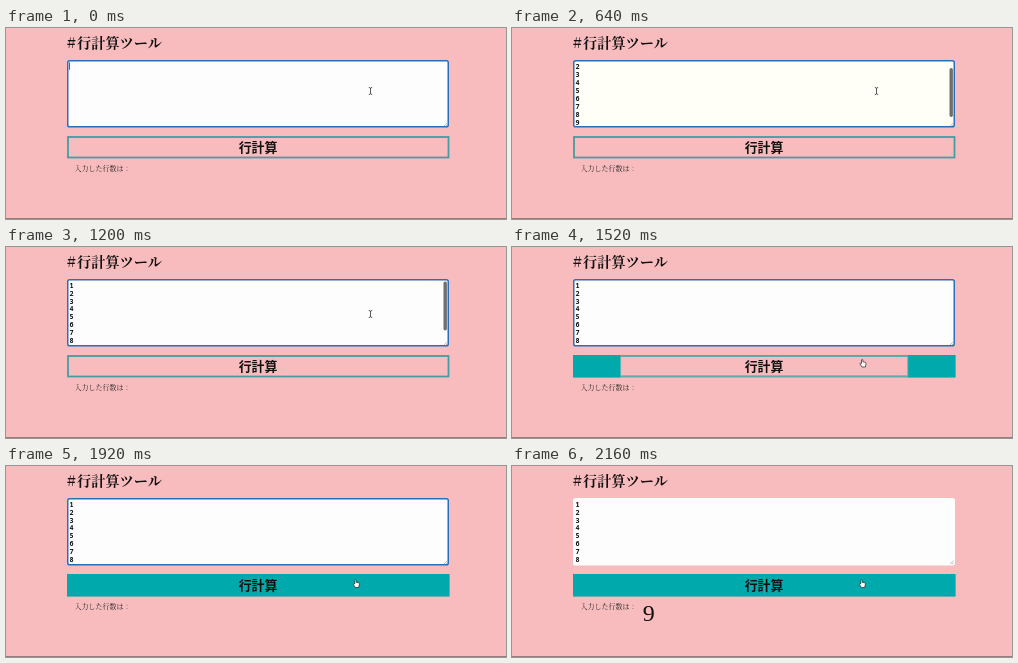
An HTML page for the animation above (2.56 s loop, 500 by 191 pixels).

```html
<!DOCTYPE html>
<html lang="ja">
<head>
<meta charset="utf-8">
<title>行計算ツール</title>
<style>
  html, body { margin: 0; width: 100%; height: 100%; overflow: hidden; background: #f9bcbe; }
  svg { display: block; width: 100vw; height: 100vh; }
  .serif { font-family: "Noto Serif CJK JP", "Noto Serif JP", "Noto Sans CJK JP", "Noto Sans CJK", serif; }
  .sans { font-family: "Noto Sans CJK JP", "Noto Sans CJK", sans-serif; }
  .mono { font-family: "Noto Sans Mono", monospace; }
  .count { font-family: "Liberation Serif", serif; }
</style>
</head>
<body>
<svg viewBox="0 0 500 191" xmlns="http://www.w3.org/2000/svg">
  <defs>
    <clipPath id="view"><rect x="62" y="33" width="380" height="65.5"/></clipPath>
  </defs>
  <rect width="500" height="191" fill="#f9bcbe"/>
  <rect y="190" width="500" height="1" fill="#9b7a7c"/>

  <text class="serif" y="20" font-size="14.2" font-weight="700" fill="#111"><tspan x="61">#</tspan><tspan x="71">行計算ツール</tspan></text>

  <rect id="area" x="61.75" y="32.75" width="380.5" height="66" rx="1.8" stroke-width="1.5"/>
  <g clip-path="url(#view)">
    <g id="lines" class="mono" font-size="6.8" font-weight="600" fill="#111"></g>
    <rect id="caret" width="0.7" height="7.4" fill="#222"/>
  </g>
  <rect id="thumb" x="437.5" width="3.4" height="49" rx="1.7" fill="#6f6f6f"/>
  <path d="M438 98 L441.3 94.7 M440 98 L441.3 96.7" stroke="#999" stroke-width="0.6"/>

  <rect x="62" y="109" width="380.5" height="20.5" fill="#f9bcbe" stroke="#449da0" stroke-width="1.8"/>
  <g id="fill">
    <rect id="left" x="61" y="108" height="22.4"/>
    <rect id="right" y="108" height="22.4"/>
    <rect id="hole" y="109.2" height="20" fill="none" stroke="#6ab0b2" stroke-width="1"/>
  </g>
  <text id="label" class="sans" x="252" y="123.8" font-size="12.9" font-weight="700" text-anchor="middle">行計算</text>

  <text class="serif" x="68.5" y="142.6" font-size="7" fill="#222">入力した行数は：</text>
  <text id="count" class="count" x="130.8" y="154.5" font-size="24" fill="#111">9</text>

  <g id="pointer">
    <path id="beam" d="M-1.7 -3.5 Q0 -3.5 0 -2.4 Q0 -3.5 1.7 -3.5 M0 -2.6 V2.6 M-1.7 3.5 Q0 3.5 0 2.4 Q0 3.5 1.7 3.5" fill="none" stroke="#333" stroke-width="0.8"/>
    <path id="arrow" d="M-2 -4 V3 L-0.4 1.6 L0.7 4 L1.8 3.5 L0.8 1.2 H3 Z" fill="#222" stroke="#fff" stroke-width="0.5"/>
    <path id="hand" d="M-1.5 0.4 V-3.2 Q-0.8 -4.2 -0.1 -3.2 V-1.2 L2.2 -0.8 Q3.2 -0.4 3 0.8 L2.4 4 H-1 L-3 0.8 Q-2.8 -0.4 -1.5 0.4 Z" fill="#fff" stroke="#222" stroke-width="0.7" stroke-linejoin="round"/>
  </g>
</svg>
<script>
const LOOP = 2560, STEP = 80, PITCH = 7.95;
const PASTE = 240, HOVER = 1480, PRESS = 2000, RELEASE = 2160;
const BOX = { x: 61, w: 382.4 };
const $ = id => document.getElementById(id);
const set = (id, attrs) => {
  for (const k in attrs) $(id).setAttribute(k, attrs[k]);
};
const show = (id, on) => set(id, { visibility: on ? "visible" : "hidden" });
const clamp = v => Math.min(1, Math.max(0, v));

// Linear interpolation through [time, value] points.
function track(points, t) {
  if (t <= points[0][0]) return points[0][1];
  for (let i = 1; i < points.length; i++) {
    const [a, u] = points[i - 1], [b, v] = points[i];
    if (t <= b) return u + (v - u) * (t - a) / (b - a);
  }
  return points[points.length - 1][1];
}

const scrollPath = [[560, 11], [640, 7.4], [720, 2.5], [800, 0]];
const pointerX = [[1200, 364.5], [1360, 360], [1520, 351], [1760, 350.3]];
const pointerY = [[1120, 63], [1200, 67], [1280, 77], [1360, 92], [1440, 109], [1520, 116], [1760, 117.5]];

$("lines").innerHTML = Array.from({ length: 9 }, (_, i) =>
  `<text x="63.4" y="${40.6 + i * PITCH}">${i + 1}</text>`).join("");

function drawArea(t) {
  const pasted = t >= PASTE, focused = t < PRESS;
  const scroll = pasted ? track(scrollPath, t) : 0;
  const warm = pasted && t < 720;
  set("area", {
    fill: warm ? "#fffef7" : "#fdfdfd",
    stroke: focused ? "#2871b8" : "#fdfdfd"
  });
  show("lines", pasted);
  set("lines", { transform: `translate(0 ${-scroll})` });
  set("caret", {
    x: pasted ? 67.7 : 63.3,
    y: 34.4 + (pasted ? 8 * PITCH - scroll : 0)
  });
  show("caret", focused && (t < 640 || t >= 1040));
  set("thumb", {
    y: 34.5 + scroll * 0.75,
    opacity: pasted ? 1 - clamp((t - 1200) / 240) : 0
  });
}

function drawButton(t) {
  const p = clamp((t - HOVER) / 300);
  const w = BOX.w / 2 * (1 - (1 - p) ** 2);
  const pressed = t >= PRESS && t < RELEASE;
  show("fill", p > 0);
  set("fill", { fill: pressed ? "#044a4a" : "#00a9ab" });
  set("left", { width: w });
  set("right", { x: BOX.x + BOX.w - w, width: w });
  set("hole", { x: BOX.x + w, width: BOX.w - 2 * w, opacity: p < 1 ? 1 : 0 });
  set("label", { fill: pressed ? "#f4ffff" : "#111" });
}

function drawPointer(t) {
  const x = track(pointerX, t), y = track(pointerY, t);
  set("pointer", { transform: `translate(${x} ${y})` });
  show("beam", y < 99);
  show("arrow", y >= 99 && y < 108);
  show("hand", y >= 108);
}

function draw(now) {
  const t = Math.floor(now % LOOP / STEP) * STEP;
  drawArea(t);
  drawButton(t);
  drawPointer(t);
  show("count", t >= RELEASE);
}

let start;
function tick(now) {
  start ??= now;
  draw(Math.max(0, now - start));
  requestAnimationFrame(tick);
}
draw(0);
requestAnimationFrame(tick);
</script>
</body>
</html>
```
